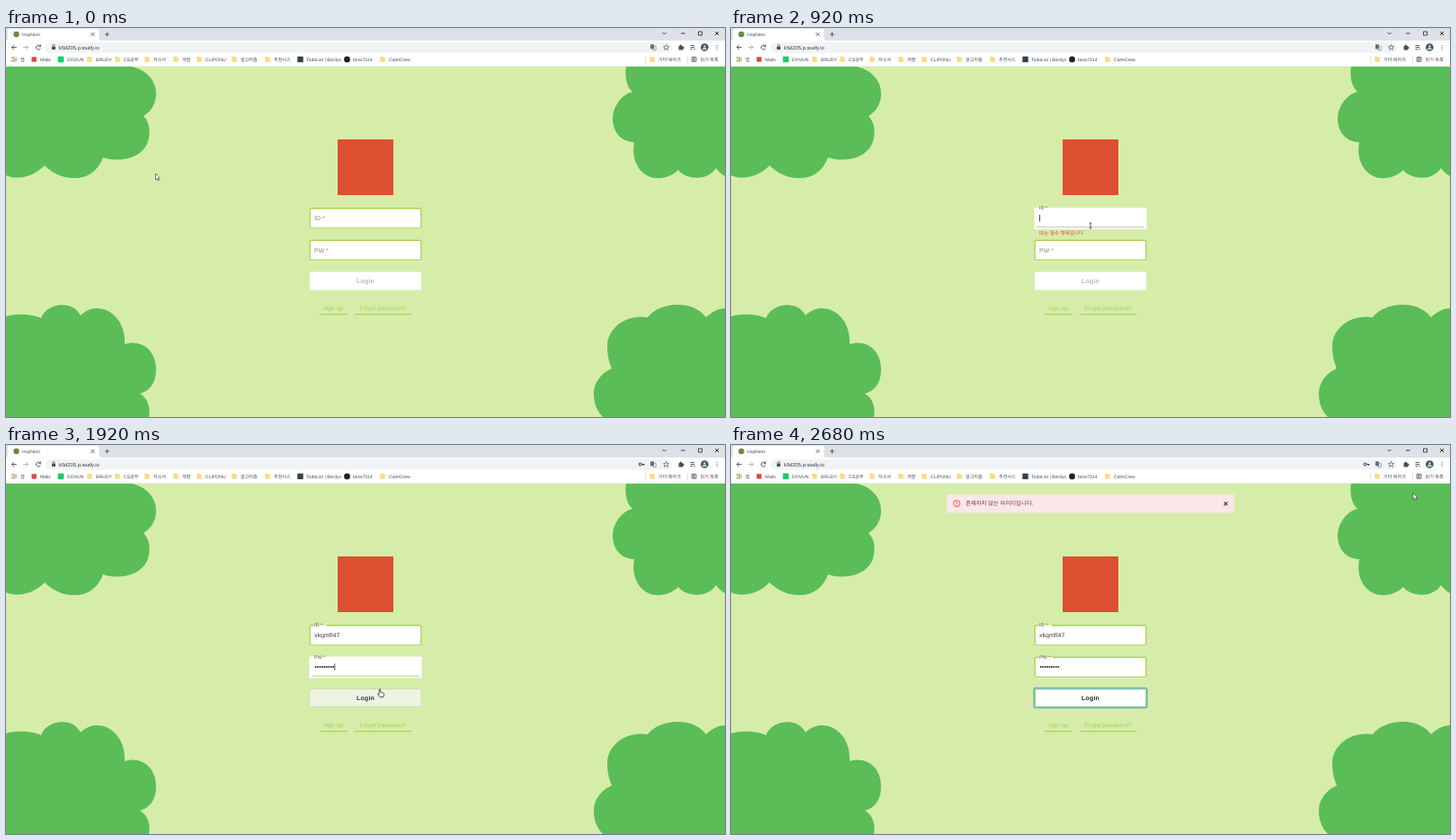
Write an HTML page with a canvas that moves like this. It is 800 px wide and 433 px high and loops after 2720 ms.

```html
<!DOCTYPE html>
<html lang="ko">
<head>
<meta charset="utf-8">
<title>Login form</title>
<style>
html, body { margin: 0; width: 100%; height: 100%; overflow: hidden; background: #d6eda9; }
canvas { display: block; width: 800px; height: 433px; }
</style>
</head>
<body>
<canvas id="stage" width="800" height="433"></canvas>
<script>
const ctx = document.getElementById('stage').getContext('2d');
const LOOP = 2720, STEP = 40;
const KOREAN = '"Noto Sans CJK KR", "Noto Sans CJK JP", "Noto Sans CJK", sans-serif';
const ARIAL = '"Liberation Sans", Arial, sans-serif';
const UI = '"Liberation Sans", ' + KOREAN;
const PAGE = '#d6eda9', TREE = '#5abd58', LIME = '#9fce45', INK = '#4b4f54';
const USER_ID = 'xkqmfl47', PW_LENGTH = 9;

// Moments of the interaction, in ms
const ID_FOCUS = 760, ID_TYPE = 960, PW_FOCUS = 1360, PW_TYPE = 1400;
const ID_SETTLED = 1680, CLICK = 2000, LEAVE = 2280;

const clamp = v => Math.max(0, Math.min(1, v));
const progress = (t, from, to) => clamp((t - from) / (to - from));
const ease = p => p * p * (3 - 2 * p);
const mix = (a, b, p) => a + (b - a) * p;
const typed = (t, start, gap, max) => t < start ? 0 : Math.min(max, 1 + Math.floor((t - start) / gap));

function rect(x, y, w, h, color) {
  ctx.fillStyle = color;
  ctx.fillRect(x, y, w, h);
}

function round(x, y, w, h, r, color) {
  ctx.beginPath();
  ctx.roundRect(x, y, w, h, r);
  ctx.fillStyle = color;
  ctx.fill();
}

function frameRect(x, y, w, h, r, color, width) {
  ctx.beginPath();
  ctx.roundRect(x, y, w, h, r);
  ctx.strokeStyle = color;
  ctx.lineWidth = width;
  ctx.stroke();
}

function disc(x, y, r, color) {
  ctx.beginPath();
  ctx.arc(x, y, r, 0, Math.PI * 2);
  ctx.fillStyle = color;
  ctx.fill();
}

function ring(x, y, r, color, width) {
  ctx.beginPath();
  ctx.arc(x, y, r, 0, Math.PI * 2);
  ctx.strokeStyle = color;
  ctx.lineWidth = width;
  ctx.stroke();
}

function shape(d, fill, stroke, width = 0.8, x = 0, y = 0) {
  const path = new Path2D(d);
  ctx.save();
  ctx.translate(x, y);
  if (fill) { ctx.fillStyle = fill; ctx.fill(path); }
  if (stroke) { ctx.strokeStyle = stroke; ctx.lineWidth = width; ctx.stroke(path); }
  ctx.restore();
}

const icon = (d, x, y, color = INK, width = 0.9) => shape(d, null, color, width, x, y);

function text(str, x, y, size, color, family = ARIAL, spacing = 0, weight = 400, align = 'left') {
  ctx.font = `${weight} ${size}px ${family}`;
  ctx.textRendering = 'geometricPrecision';
  ctx.letterSpacing = spacing + 'px';
  ctx.textAlign = align;
  ctx.fillStyle = color;
  ctx.fillText(str, x, y);
}

function folder(x) {
  round(x - 2.6, 32, 3, 2, 0.5, '#f0cb62');
  round(x - 2.6, 32.6, 5.4, 5.2, 0.5, '#f8dc83');
}

const CROSS = 'M-2 -2L2 2M2 -2L-2 2';

function drawTabs() {
  rect(0, 0, 800, 14, '#dee1e6');
  shape('M0 14Q2 14 2 11V3Q2 1 4.500 1H101Q103.500 1 103.500 3V11Q103.500 14 106 14Z', '#fff');
  disc(11.5, 7, 3.2, '#668b43');
  text('HopNest', 18, 8.9, 5.1, '#4a4d50', UI);
  icon(CROSS, 96.5, 7, INK, 0.8);
  icon('M-2.500 0H2.500M0 -2.500V2.500', 112.5, 7);
  icon('M-2 -1L0 1L2 -1', 732.5, 6, '#333');
  icon('M-2 0H2.500', 753, 6, '#222');
  icon('M-2 -2H2V2H-2Z', 772.5, 6, '#222', 0.8);
  icon(CROSS, 791, 6, '#222');
}

function drawToolbar(showKey) {
  rect(0, 14, 800, 14, '#fff');
  icon('M2.800 0H-2.500M0 -2.600L-2.600 0L0 2.600', 9, 21.5);
  icon('M-2.800 0H2.500M0 -2.600L2.600 0L0 2.600', 22, 21.5, '#a9adb1');
  icon('M2 -1.500A2.500 2.500 0 1 0 2.400 1M2.500 -3V-.8H.3', 36, 21.5);
  round(44, 16, 697, 11.5, 5.7, '#f1f3f4');
  round(51, 20.5, 4, 3.5, 0.4, INK);
  icon('M-1.200 0V-1A1.200 1.200 0 0 1 1.200 -1V0', 53, 20.6, INK, 0.7);
  text('k5d205.p.ssafy.io', 59, 23.5, 5.8, '#35383b', UI);

  if (showKey) {
    ring(705.7, 21.5, 1.5, INK, 1.1);
    icon('M0 0H3.500M2.500 0V1.500', 707, 21.5, INK, 1.1);
  }
  round(717, 18.3, 4, 5, 0.4, '#666b70');
  frameRect(719.8, 20.3, 3.4, 4.4, 0.4, '#7a7e83', 0.7);
  icon('M0 -3L.9 -1L3 -.8L1.400 .7L1.900 2.800L0 1.700L-1.900 2.800L-1.400 .7L-3 -.8L-.9 -1Z', 734.5, 21.5, INK, 0.7);
  round(748.5, 20, 4.8, 4.5, 0.5, INK);
  disc(750.7, 19.5, 1.1, INK);
  disc(753.5, 22.1, 1.1, INK);
  icon('M-2.500 -2H2M-2.500 0H2M-2.500 2H0M2 1V3', 764, 21.5);
  disc(777.3, 21.5, 4.3, '#36545a');
  disc(777.3, 20.3, 1.4, '#b6c9c7');
  shape('M-2.600 3A2.600 2.600 0 0 1 2.600 3Z', '#b6c9c7', null, 0, 777.3, 21.2);
  for (const dy of [-2, 0, 2]) disc(791, 21.5 + dy, 0.6, INK);
}

function drawBookmarks() {
  rect(0, 28, 800, 14, '#fff');
  rect(0, 42, 800, 1, '#eef2e8');
  const dots = ['#df4c3f', '#4887e8', '#f0b831', '#45a65c'];
  for (let i = 0; i < 9; i++) rect(6.4 + i % 3 * 2, 32.2 + Math.floor(i / 3) * 2, 1.4, 1.4, dots[(i * 3 + (i / 3 | 0)) % 4]);
  const label = (str, x) => text(str, x, 36.8, 5.1, '#44474a', UI);
  label('앱', 16);

  round(28.5, 32.2, 5.4, 5.4, 0, '#d94b3d');
  label('Mails', 38);
  rect(57.7, 31.6, 6.6, 6.6, '#18cf5f');
  label('DOVUN', 68);
  rect(324.3, 31.7, 6.4, 6.4, '#33414c');
  label('TodoList | Bordyx', 334);
  disc(379.5, 34.9, 3.4, '#202328');
  label('bora7314', 386);

  const folders = { BRUDY: 93, 'CS공부': 124, '자소서': 157, '개발': 189, CLIPONU: 215,
    '알고리즘': 254, '추천시스': 291, CalmCrew: 419, '기타 북마크': 719 };
  for (const [name, x] of Object.entries(folders)) {
    folder(x);
    label(name, x + 7);
  }
  rect(711, 31, 0.7, 8, '#d2d4d7');
  rect(758, 31, 0.7, 8, '#d2d4d7');
  frameRect(763, 32.3, 5, 5, 0.5, INK, 0.8);
  icon('M-1.500 -1H2M-1.500 1H2M-.5 -2V2', 765.5, 34.8, INK, 0.7);
  label('읽기 목록', 772.5);
}

function drawPage() {
  rect(0, 0, 800, 433, PAGE);
  shape('M0 42H133C155 44 168 58 167 75C166 86 161 93 153 98C161 106 161 119 157 129C149 146 125 150 108 144C102 161 88 168 75 167C62 167 51 161 43 153C31 165 15 170 0 164Z', TREE);
  shape('M690 42C688 55 691 66 697 71C685 74 675 87 675 102C676 118 686 127 699 127C695 148 706 165 722 167C733 168 742 164 748 158C755 168 779 172 790 156C793 160 796 163 800 165V42Z', TREE);
  shape('M0 321C14 317 30 319 39 323C45 306 74 302 83 320C102 301 134 318 132 352C150 346 167 358 167 380C167 395 160 404 149 407C158 412 161 423 159 433H0Z', TREE);
  shape('M800 312C793 312 785 316 779 322C771 312 760 308 747 308C734 308 721 313 714 322C690 318 669 334 669 354C669 364 671 372 674 379C662 384 654 395 654 407C654 418 658 427 664 433H800Z', TREE);
  rect(369, 124, 62, 62, '#dc5031');
}

// Outlined input; while edited the outline gives way to a thin underline.
function drawField(y, name, { editing, float, underline }) {
  rect(337.5, y, 125, 24, '#fff');
  if (editing) {
    rect(340, y + 21.3, 120, 0.8, underline);
  } else {
    frameRect(338.1, y + 0.7, 123.8, 22.2, 1, '#a6d24f', 1.4);
    if (float > 0) {
      rect(342, y - 0.2, 15 * float, 0.8, PAGE);
      rect(342, y + 0.6, 15 * float, 1.4, '#fff');
    }
  }
  text(name, 343, mix(y + 14, y + 2.2, float), mix(6.9, 5.3, float), float > 0.5 ? '#555' : '#858585', ARIAL, 0.1);
}

function caret(x, y) {
  rect(x, y, 0.8, 7.5, '#222');
}

function drawForm(t) {
  const idCount = typed(t, ID_TYPE, 44, USER_ID.length);
  const pwCount = typed(t, PW_TYPE, 44, PW_LENGTH);
  const idEditing = t >= ID_FOCUS && t < ID_SETTLED;
  const pwEditing = t >= PW_FOCUS && t < CLICK;
  const valid = pwCount >= 8;

  drawField(200, 'ID *', { editing: idEditing, float: progress(t, ID_FOCUS - 40, ID_FOCUS + 40), underline: idCount ? '#a9bd8e' : '#b5b5b5' });
  const value = USER_ID.slice(0, idCount);
  text(value, 343, 214, 6.9, '#333', ARIAL, 0.1);
  if (idEditing && t < PW_FOCUS) caret(343.2 + ctx.measureText(value).width, 208);
  if (t >= ID_FOCUS + 40 && !idCount) text('ID는 필수 항목입니다', 343, 230.3, 5.5, '#d5433c', KOREAN);

  drawField(235.5, 'PW *', { editing: pwEditing, float: progress(t, PW_FOCUS - 40, PW_FOCUS + 40), underline: valid ? LIME : '#a9bd8e' });
  for (let i = 0; i < pwCount; i++) disc(344.6 + i * 2.45, 247, 0.95, '#222');
  if (pwEditing) caret(343.4 + pwCount * 2.45, 243.3);
  if (pwEditing && !valid) text('비밀번호는 8~16자 사이로 입력해 주세요', 343, 265.6, 5.5, '#d5433c', KOREAN);

  drawLogin(t, valid);

  text('sign up', 353.3, 314.4, 6.5, '#a3cf52', ARIAL, 0.12);
  rect(348.5, 318.2, 31.5, 1, LIME);
  text('Forget password?', 393.3, 314.4, 6.3, '#a3cf52', ARIAL, 0.12);
  rect(388.3, 318.2, 63, 1, LIME);
}

function drawLogin(t, valid) {
  const hover = t >= 1880 && t < LEAVE + 40;
  const clicked = t >= CLICK;
  let ink = valid ? '#222' : '#b5b5b5';
  rect(338, 271.5, 124, 20, '#fff');

  if (hover && !clicked) {
    const p = progress(t, 1960, CLICK);
    rect(337.5, 271, 125, 21, `rgb(${mix(238, 164, p)},${mix(243, 206, p)},${mix(228, 88, p)})`);
    frameRect(338, 271.5, 124, 20, 0.5, '#c3d79e', 0.8);
    ink = p > 0.5 ? '#fff' : '#333';
  }
  if (hover && clicked) {
    rect(337.5, 271, 125, 21, '#a2cd56');
    ctx.save();
    ctx.beginPath();
    ctx.rect(337.5, 271, 125, 21);
    ctx.clip();
    ctx.globalAlpha = 1 - progress(t, 2100, 2220);
    disc(417, 276, 60 * (t - CLICK) / 40, '#afd46d');
    ctx.restore();
    ink = '#fff';
  }
  if (clicked) {
    if (!hover) frameRect(338.6, 272, 122.8, 19.2, 0.5, '#b3d77b', 1);
    frameRect(337.2, 270.6, 125.6, 21.8, 1.5, '#67b1b9', 1.6);
  }
  text('Login', 400, 283.9, 7, ink, ARIAL, 0.2, 700, 'center');
}

function drawAlert() {
  round(240, 55, 320, 20.5, 1, '#fbe7e9');
  ring(251.2, 65.2, 3.6, '#df4a3d', 0.9);
  icon('M0 -2V.5M0 1.200V2', 251.2, 65.2, '#df4a3d');
  text('존재하지 않는 아이디입니다.', 261, 67.4, 6.35, '#743537', KOREAN);
  icon(CROSS, 550.5, 65.3, '#4b2528', 1.1);
}

const mousePath = [
  [0, 166.5, 162], [160, 166.5, 162], [560, 400, 220], [1760, 400, 220],
  [1880, 416, 271.5], [LEAVE, 416, 271.5], [2520, 759, 53.5], [LOOP, 759, 53.5]
];

function mouseAt(t) {
  const i = mousePath.findIndex(k => k[0] > t);
  const [t0, x0, y0] = mousePath[i - 1], [t1, x1, y1] = mousePath[i];
  const p = ease(progress(t, t0, t1));
  return [mix(x0, x1, p), mix(y0, y1, p)];
}

function drawMouse(t) {
  if (t >= 560 && t < 640) return;
  const [x, y] = mouseAt(t);
  const inColumn = x > 338 && x < 462;
  if (inColumn && y > 200 && y < 259) {
    icon('M-1.300 -3H1.300M0 -3V3M-1.300 3H1.300', x, y, '#333', 0.8);
  } else if (inColumn && y > 270 && y < 292) {
    shape('M-.7 .4Q0 -.5 .7 .4V3.600L4 4.500Q5 5 4.600 6.500L4 9H0L-2.500 5.700Q-2.200 4.500 -.7 5.800Z', '#fff', '#333', 0.8, x, y);
  } else {
    shape('M0 0V7L1.600 5.600L2.700 8L3.900 7.400L2.900 5.200H5Z', '#fff', '#444', 0.7, x, y);
  }
}

function draw(now) {
  const t = Math.floor(now % LOOP / STEP) * STEP;
  drawPage();
  drawTabs();
  drawToolbar(t >= PW_TYPE);
  drawBookmarks();
  drawForm(t);
  if (t >= CLICK) drawAlert();
  drawMouse(t);
}

const start = performance.now();
function tick() {
  draw(performance.now() - start);
  requestAnimationFrame(tick);
}
tick();
</script>
</body>
</html>
```
